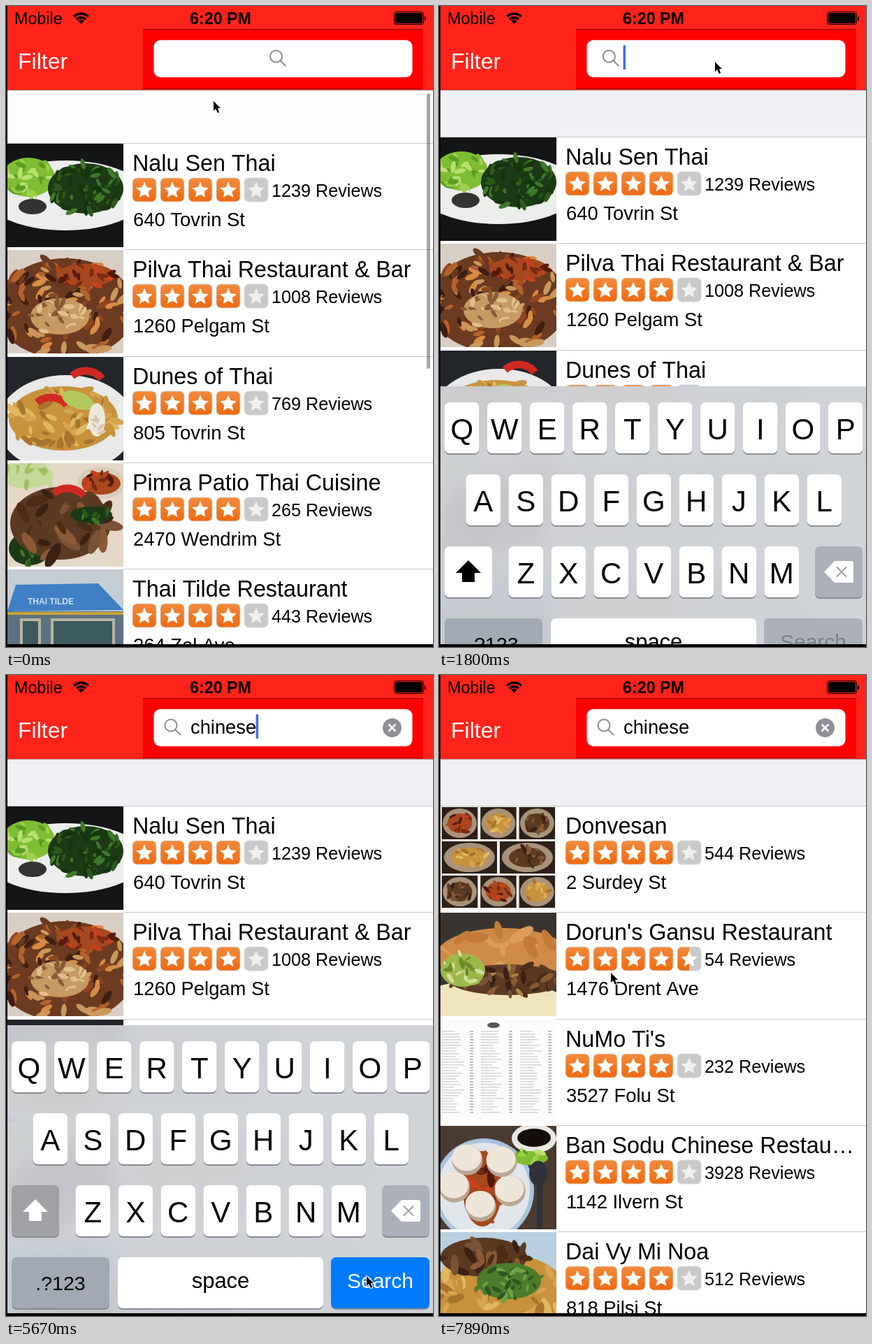
Animation, 611 px wide and 917 px high, one loop 8000 ms. Source, as an HTML page with a canvas:

```html
<!DOCTYPE html>
<html lang="en">
<head>
<meta charset="utf-8">
<title>Restaurant search</title>
<style>
  html, body { margin: 0; width: 100%; height: 100%; overflow: hidden; background: #000; }
  canvas { display: block; }
</style>
</head>
<body>
<canvas id="stage" width="611" height="917"></canvas>
<script>
const W = 611, H = 917, LOOP = 8000;
const LIST_TOP = 187, ROW = 152.3, PHOTO_W = 166, PHOTO_H = 148;
const GRAY = '#8e8e93', LINE = '#c8c7cc';
const stage = document.getElementById('stage');
const screen2d = stage.getContext('2d');
let pen = screen2d;

// ---------- drawing helpers ----------
let seed = 7;
const rnd = () => (seed = (seed * 16807) % 2147483647) / 2147483647;

function rect(color, x, y, w, h, r = 0) {
  pen.fillStyle = color;
  pen.beginPath();
  pen.roundRect(x, y, w, h, r);
  pen.fill();
}
function oval(color, x, y, rx, ry = rx, turn = 0) {
  pen.fillStyle = color;
  pen.beginPath();
  pen.ellipse(x, y, rx, ry, turn, 0, 7);
  pen.fill();
}
function poly(color, ...points) {
  pen.fillStyle = color;
  pen.beginPath();
  for (const [x, y] of points) pen.lineTo(x, y);
  pen.closePath();
  pen.fill();
}
function stroke(color, width, trace) {
  pen.strokeStyle = color;
  pen.lineWidth = width;
  pen.beginPath();
  trace();
  pen.stroke();
}
function cross(x, y, r, color, width) {
  stroke(color, width, () => {
    for (const s of [-1, 1]) {
      pen.moveTo(x - r, y - r * s);
      pen.lineTo(x + r, y + r * s);
    }
  });
}
function text(string, x, y, size, color = '#000', align = 'left', weight = '') {
  pen.font = `${weight} ${size}px "Liberation Sans", Arial, sans-serif`;
  pen.fillStyle = color;
  pen.textAlign = align;
  pen.fillText(string, x, y);
}
// A mound of food: an oval covered with random bits of the given colours.
function heap(colors, x, y, rx, ry, size = 9) {
  const palette = colors.split(' ');
  oval(palette[0], x, y, rx, ry);
  for (let i = 0; i < 3 * rx * ry / size ** 2; i++) {
    const a = rnd() * 2 * Math.PI, d = Math.sqrt(rnd()), s = size * (.5 + rnd() / 2);
    oval(palette[i % palette.length], x + rx * d * Math.cos(a), y + ry * d * Math.sin(a), s, s * .4, a * 3);
  }
}
const pepper = (x, y) => stroke('#cf2a22', 11, () => pen.arc(x, y, 30, 4, 5.6));

// ---------- photos ----------
const DARK_GREENS = '#1d3a16 #2c5a1c #16330f #3f7a2a';
const LIGHT_GREENS = '#7fbd33 #9fd24c #5d9c25 #b9e070';
const BROWNS = '#5a3a22 #4c2c18 #8a5a36 #3a2114 #7a5236';
const REDS = '#a8481e #7a2a12 #c8421c #541a0c';
const NOODLES = '#c8923c #e0b860 #a8742c #d6a452';

const photos = [
  ['#141516', () => { // salad
    oval('#eceeec', 83, 74, 115, 50);
    heap(LIGHT_GREENS, 30, 48, 38, 28);
    heap(DARK_GREENS, 112, 64, 54, 36);
    oval('#33332f', 36, 90, 20, 11);
  }],
  ['#d8cfc4', () => { // stir fry
    heap('#6b3a20 #b4622c #3f1d12 #d88c42 #8f451f #c9985c', 83, 84, 100, 72, 13);
    heap(REDS, 112, 36, 42, 16);
    heap('#c79a62 #e2c08c #8a5a34', 75, 95, 42, 26);
  }],
  ['#22262a', () => { // noodle soup
    oval('#e8e9e8', 84, 96, 98, 70);
    heap(NOODLES, 80, 88, 78, 46, 12);
    pepper(112, 50);
    pepper(62, 88);
    oval('#b4c860', 101, 62, 24, 12, .35);
    heap('#eee8dc #d8c8b0', 128, 90, 12, 24);
  }],
  ['#e4d8c6', () => { // grilled beef
    heap('#c4d898 #9fbf62', 28, 18, 38, 18, 14);
    oval('#d8cdbc', 134, 28, 34, 23);
    heap(REDS, 134, 29, 28, 16);
    heap(DARK_GREENS, 32, 122, 30, 24);
    heap(BROWNS, 76, 86, 72, 52, 20);
    heap(DARK_GREENS, 120, 74, 30, 12);
    pepper(86, 66);
  }],
  ['#c4ccd4', () => { // storefront
    rect('#5c7280', 0, 60, PHOTO_W, 88);
    poly('#3f7fc4', [12, 22], [130, 20], [166, 58], [0, 60]);
    text('THAI TILDE', 62, 50, 12, '#cfe0ef', 'center', 'bold');
    rect('#c9a63a', 0, 61, PHOTO_W, 4);
    for (const [x, w] of [[18, 30], [62, 92]]) {
      rect('#b8b4a0', x, 70, w, 78);
      rect('#3c5a60', x + 4, 74, w - 8, 50);
    }
  }],
  ['#f4f2ee', () => { // grid of dishes
    for (let row = 0; row < 3; row++) {
      const columns = row == 1 ? 2 : 3, w = PHOTO_W / columns;
      for (let i = 0; i < columns; i++) {
        rect('#2c2018', i * w + 2, row * 49 + 1, w - 4, 46);
        oval('#a8927a', (i + .5) * w, row * 49 + 24, w * .44, 21);
        heap([REDS, NOODLES, BROWNS][(row + i) % 3], (i + .5) * w, row * 49 + 24, w * .32, 14, 7);
      }
    }
  }],
  ['#3a3430', () => { // sandwich
    oval('#f0e4bc', 70, 140, 120, 44);
    heap('#d08a48 #dd9c5a #c47a38', 90, 62, 96, 40, 20);
    heap(BROWNS + ' #b08a4a', 96, 96, 84, 22, 11);
    heap('#9db848 #6c8c2c #d6dc9c', 32, 82, 32, 24);
  }],
  ['#fbfbfb', () => { // printed menu
    oval('#555', 76, 8, 9, 4);
    for (let x = 2; x < PHOTO_W; x += 56)
      for (let y = 16; y < 134; y += 4) {
        rect('#d4d4d4', x, y, 16 + 16 * rnd(), 1.5);
        rect('#aaa', x + 40, y, 5, 1.5);
      }
  }],
  ['#4a3a30', () => { // steamed buns
    oval('#a9c3dc', 62, 92, 72, 74);
    oval('#e0e6ea', 62, 92, 66, 68);
    oval('#e9e7e2', 134, 18, 32, 21);
    oval('#150d0a', 134, 17, 24, 13);
    heap(LIGHT_GREENS, 128, 46, 26, 10);
    heap(REDS, 60, 90, 28, 54, 14);
    for (let a = .4; a < 6; a += 1.25) {
      const x = 60 + 42 * Math.cos(a), y = 76 + 36 * Math.sin(a);
      oval('#b8a794', x + 1, y + 3, 22);
      oval('#efe6da', x, y, 21, 19);
    }
    oval('#2f323a', 140, 68, 13, 18);
    rect('#2f323a', 138, 80, 8, 68);
  }],
  ['#b9cfe0', () => { // noodles with meat
    heap(NOODLES, 84, 90, 100, 60, 14);
    heap(BROWNS, 62, 36, 62, 28, 15);
    heap('#4c7c2c #6fa042 #2f5520', 98, 70, 46, 26);
  }]
].map(([backdrop, paint]) => {
  const photo = document.createElement('canvas');
  photo.width = PHOTO_W;
  photo.height = PHOTO_H;
  pen = photo.getContext('2d');
  rect(backdrop, 0, 0, PHOTO_W, PHOTO_H);
  pen.filter = 'blur(.7px)';
  paint();
  return photo;
});
pen = screen2d;

// ---------- list ----------
const thaiPlaces = [
  ['Nalu Sen Thai', 4, 1239, '640 Tovrin St'],
  ['Pilva Thai Restaurant & Bar', 4, 1008, '1260 Pelgam St'],
  ['Dunes of Thai', 4, 769, '805 Tovrin St'],
  ['Pimra Patio Thai Cuisine', 4, 265, '2470 Wendrim St'],
  ['Thai Tilde Restaurant', 4, 443, '264 Zel Ave']
];
const chinesePlaces = [
  ['Donvesan', 4, 544, '2 Surdey St'],
  ["Dorun's Gansu Restaurant", 4.5, 54, '1476 Drent Ave'],
  ["NuMo Ti's", 4, 232, '3527 Folu St'],
  ['Ban Sodu Chinese Restau…', 4, 3928, '1142 Ilvern St'],
  ['Dai Vy Mi Noa', 4, 512, '818 Pilsi St']
];

function star(x, y, fill) {
  rect('#dedad6', x - 17.5, y - 17.5, 35, 35, 7);
  rect('#c9c9c9', x - 16.5, y - 16.5, 33, 33, 6);
  if (fill > 0) {
    const shade = pen.createLinearGradient(0, y - 17, 0, y + 17);
    shade.addColorStop(0, '#f28a3c');
    shade.addColorStop(1, '#ee6a10');
    rect(shade, x - 16.5, y - 16.5, 33 * Math.min(fill, 1), 33, fill < 1 ? [6, 0, 0, 6] : 6);
  }
  const points = Array.from({ length: 10 }, (_, i) => {
    const r = i % 2 ? 5.8 : 12.5, a = i * Math.PI / 5;
    return [x + r * Math.sin(a), y + 1 - r * Math.cos(a)];
  });
  poly(fill > 0 ? '#fff' : '#f0f0f0', ...points);
}

function drawList(places, firstPhoto, top) {
  rect('#fff', 0, top, W, H);
  places.forEach(([name, stars, reviews, address], i) => {
    const y = Math.round(top + i * ROW);
    rect(LINE, i ? 168 : 2, y, W, 1);
    pen.drawImage(photos[firstPhoto + i], 2, y + 1);
    text(name, 181, y + 40, 32.3);
    for (let s = 0; s < 5; s++) star(198 + 40 * s, y + 67, stars - s);
    text(reviews + ' Reviews', 380, y + 77, 25.2);
    text(address, 182, y + 119, 27.4);
  });
}

// ---------- header ----------
function drawStatusBar() {
  text('Mobile', 12, 26, 23.3);
  text('6:20 PM', 307, 26, 23.3, '#000', 'center', 'bold');
  for (const r of [3, 9, 14.5])
    stroke('#000', r == 3 ? 6 : 3.4, () => pen.arc(107.5, 25.5, r, -2.36, -.78));
  stroke('#000', 1, () => pen.roundRect(555.5, 8.5, 42, 18, 3));
  rect('#000', 557, 10, 39, 15, 2);
  rect('#000', 599, 15, 2, 6, 1);
}

function drawHeader(query, iconX, caretOn) {
  rect('#ff231a', 0, 0, W, 120);
  rect('#a8908e', 0, 120, W, 1);
  drawStatusBar();
  text('Filter', 17, 90, 32, '#fff');
  rect('#8c0000', 196, 33, 401, 86);
  rect('#f00', 196, 34, 401, 84);
  rect('#fff', 211.5, 48.7, 370, 53.3, 9.5);
  stroke(GRAY, 2, () => {
    pen.arc(iconX - 2.5, 72, 8.5, .785, 7.07);
    pen.lineTo(iconX + 11.5, 86);
  });
  text(query, 264, 84, 27.3);
  if (caretOn) rect('#426bf2', 263.5 + pen.measureText(query).width, 56, 3.5, 35, 1);
  if (query) {
    oval(GRAY, 552.5, 75.5, 13.5);
    cross(552.5, 75.5, 5, '#fff', 2.5);
  }
}

// ---------- keyboard ----------
function key(x, y, w, color = '#fff', label = '', size = 42, baseline = 53, ink = '#000') {
  rect('#888b90', x, y + 2, w, 73, 7);
  rect(color, x, y, w, 73, 7);
  text(label, x + w / 2, y + baseline, size, ink, 'center');
}

function drawKeyboard(top, typed) {
  // frosted glass over the list
  pen.save();
  pen.beginPath();
  pen.rect(0, top, W, H);
  pen.clip();
  pen.filter = 'blur(14px)';
  pen.drawImage(stage, 0, 0);
  pen.filter = 'none';
  rect('rgba(205,208,214,.93)', 0, top, W, H);
  pen.restore();

  const rowY = row => top + 23 + 103 * row;
  ['QWERTYUIOP', 'ASDFGHJKL', 'ZXCVBNM'].forEach((letters, row) =>
    [...letters].forEach((letter, i) =>
      key(313 + (i - letters.length / 2) * 61, rowY(row), 49.5, '#fff', letter)));

  const y = rowY(2), ink = typed ? '#fff' : '#000';
  key(8, y, 68, typed ? '#a0a1a5' : '#fff');
  poly(ink, [42, y + 20], [60, y + 38], [24, y + 38]);
  rect(ink, 33, y + 37, 18, 14);
  key(538, y, 68, '#abb0bb');
  poly('#fff', [551, y + 36.5], [566, y + 21], [566, y + 52]);
  rect('#fff', 565, y + 21, 28, 31, 3);
  cross(576, y + 36.5, 7, '#9a9fa9', 2);

  key(8, rowY(3), 140, '#a1a9b4', '.?123', 28.5, 47);
  key(160, rowY(3), 294, '#fff', 'space', 31, 44);
  key(465, rowY(3), 141, typed ? '#007aff' : '#abb0bb', 'Search', 30, 44, typed ? '#fff' : '#7b8088');
}

function drawPointer(x, y) {
  const shape = [[0, 0], [0, 14], [3, 11], [6, 17], [8, 16], [6, 10], [10, 10]].map(([dx, dy]) => [x + dx, y + dy]);
  poly('#000', ...shape);
  pen.lineJoin = 'round';
  stroke('#fff', 2, () => { shape.forEach(p => pen.lineTo(...p)); pen.closePath(); });
  poly('#000', ...shape);
}

// ---------- motion ----------
function ease(t, start, duration) {
  const p = Math.min(1, Math.max(0, (t - start) / duration));
  return p * p * (3 - 2 * p);
}

// Each glide brings the pointer to a new resting place: start, duration, x, y.
const glides = [
  [0, 300, 297, 240], [450, 600, 395, 80], [1950, 600, 252, 728], [4790, 600, 516, 860],
  [6110, 450, 375, 803], [6690, 450, 226, 152], [7140, 600, 296, 426], [7740, 150, 246, 426]
];
const pointerAt = t => glides.reduce(([x, y], [start, duration, toX, toY]) => {
  const p = ease(t, start, duration);
  return [x + (toX - x) * p, y + (toY - y) * p];
}, [297, 136]);

// Two bursts of typing with a pause after "chin".
function typedAt(t) {
  const count = t < 4340 ? Math.min(4, 1 + (t - 3440) / 100) : 5 + (t - 4340) / 150;
  return 'chinese'.slice(0, Math.max(0, Math.floor(count)));
}

// The screen refreshes every 150 ms, restarting its rhythm at a few moments.
function hold(t) {
  const base = [6690, 5810, 2690, 0].find(start => t >= start);
  return base + Math.floor((t - base) / 150) * 150;
}

function draw(time) {
  const t = hold(time), query = typedAt(t);
  const pull = 9 * (1 - ease(t, 0, 300));
  const keyboardShown = ease(t, 1440, 450) - ease(t, 5650, 440);
  const caretOn = t >= 1500 && t < 5690 && (t < 2550 || t >= 2990);

  rect(t < 150 ? '#fdfdfd' : '#efeff4', 0, 0, W, H);
  if (t < 6400) drawList(thaiPlaces, 0, LIST_TOP + pull);
  else drawList(chinesePlaces, 5, LIST_TOP);
  rect(`rgba(0,0,0,${.35 * (1 - ease(t, 300, 600))})`, 602, 125, 5, 403 - pull, 2.5);
  drawHeader(query, 389 - 150.5 * ease(t, 1410, 450), caretOn);
  if (keyboardShown > 0) drawKeyboard(Math.round(917 - 416 * keyboardShown), query);
  drawPointer(...pointerAt(t));
  rect('#000', 0, 0, 2, H);
  rect('#000', 0, 913, W, 4);
}

function tick() {
  draw(performance.now() % LOOP);
  requestAnimationFrame(tick);
}
tick();
</script>
</body>
</html>
```
